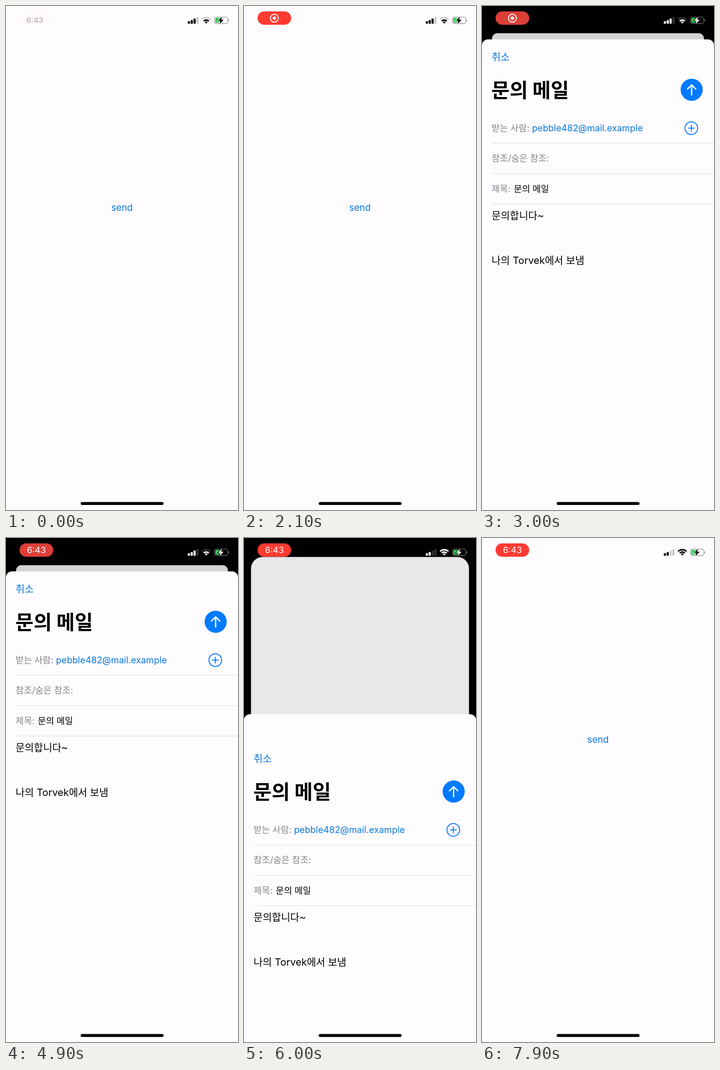
Write an HTML page that moves like this. It is 508 px wide and 1102 px high and loops after 8000 ms.

```html
<!DOCTYPE html>
<html lang="ko">
<head>
<meta charset="utf-8">
<title>Mail sheet</title>
<style>
  html, body { margin: 0; width: 100%; height: 100%; overflow: hidden; background: #000; }
  svg { display: block; width: 508px; height: 1102px; }
  text { font-family: Inter, "Noto Sans CJK KR", "Noto Sans CJK", sans-serif; font-size: 21.8px; }
  .page { fill: #fefcff; }
  .link { fill: #0879dc; }
  .label { fill: #858488; }
  .row { font-size: 19.5px; }
  .title { font-size: 43.4px; font-weight: 700; }
  .rule { stroke: #e4e3e6; stroke-width: 1.4; }
  .blue { fill: none; stroke: #007aff; stroke-width: 2; stroke-linecap: round; }
  #status { color: #000; --back: #fefcff; }
  #status rect, #status .solid { fill: currentColor; }
  .arc { fill: none; stroke: currentColor; stroke-width: 3.3; }
  .bolt { fill: currentColor; stroke: var(--back); stroke-width: 2.4; paint-order: stroke; }
</style>
</head>
<body>
<svg viewBox="0 0 508 1102" xmlns="http://www.w3.org/2000/svg">
  <rect width="508" height="1102"/>

  <g id="card">
    <rect id="cardBack" class="page" width="508" height="1102"/>
    <text class="link" x="254" y="448" text-anchor="middle" style="font-size:20.4px">send</text>
    <rect id="dim" width="508" height="1102"/>
  </g>

  <g id="sheet">
    <path id="sheetBack" class="page"/>
    <g id="content">
      <text class="link" x="21" y="46" letter-spacing="-.2">취소</text>
      <text class="title" x="20.5" y="126.6">문의 메일</text>
      <circle cx="459.1" cy="110.1" r="24.2" fill="#007aff"/>
      <path d="M459 121.5V99.5M450 108.5L459 99.5L468 108.5" fill="none" stroke="#fff"
        stroke-width="2.9" stroke-linecap="round" stroke-linejoin="round"/>

      <text class="row label" x="21" y="201">받는 사람:</text>
      <text class="link" x="109.5" y="200.5" style="font-size:19.8px">pebble482@mail.example</text>
      <circle class="blue" cx="458.3" cy="194.1" r="13.9"/>
      <path class="blue" d="M451.8 194.1h13M458.3 187.6v13"/>
      <path class="rule" d="M22 227H508M22 293.5H508M22 360H508"/>
      <text class="row label" x="21" y="267">참조/숨은 참조:</text>
      <text class="row label" x="21" y="333.5">제목:</text>
      <text class="row" x="69.5" y="333.5">문의 메일</text>

      <text x="21" y="393">문의합니다~</text>
      <text x="21" y="491">나의 Torvek에서 보냄</text>
    </g>
  </g>

  <rect x="163.5" y="1084.5" width="181.5" height="6.6" rx="3.3"/>

  <g id="status">
    <rect x="398" y="33.3" width="4.7" height="5.5" rx="1.2"/>
    <rect x="404.3" y="30.8" width="4.7" height="8" rx="1.2"/>
    <rect id="bar3" x="410.6" y="27.6" width="4.7" height="11.2" rx="1.2"/>
    <rect x="416.9" y="24.2" width="4.7" height="14.6" rx="1.2" opacity=".2"/>
    <g transform="translate(438.5 38.5)">
      <path class="solid" d="M0 0L-3.1-3.1A4.4 4.4 0 0 1 3.1-3.1Z"/>
      <path class="arc" d="M-5.48-5.48A7.75 7.75 0 0 1 5.48-5.48"/>
      <path id="wifiOuter" class="arc" d="M-9.16-9.16A12.95 12.95 0 0 1 9.16-9.16"/>
    </g>
    <path d="M456.3 28.5a4.4 4.4 0 0 1 4.4-4.4h20.5a4.4 4.4 0 0 1 4.4 4.4v5.6a4.4 4.4 0 0 1-4.4 4.4h-20.5a4.4 4.4 0 0 1-4.4-4.4z"
      fill="none" stroke="currentColor" stroke-width="1.3" opacity=".42"/>
    <path class="solid" d="M487 29a2.6 2.6 0 0 1 0 4.8z" opacity=".5"/>
    <path d="M468 26.1H460.8a2.5 2.5 0 0 0-2.5 2.5v5.4a2.5 2.5 0 0 0 2.5 2.5H468z" fill="#34c759"/>
    <path class="bolt" d="M473 22.8L464.3 32.4H469.4L467.7 39.8L476.4 30.1H471.2Z"/>
  </g>

  <text id="clock" x="63" y="37" text-anchor="middle" style="font-size:16.4px;font-weight:600">6:43</text>
  <g id="pill">
    <rect id="pillBack" x="29.7" y="11.8" width="73.6" height="29.2" rx="14.6"/>
    <g id="record">
      <circle cx="66.5" cy="26.6" r="8.7" fill="none" stroke="#fff" stroke-width="2"/>
      <circle cx="66.5" cy="26.6" r="3.7" fill="#fff"/>
    </g>
    <text id="pillClock" x="66.5" y="33.2" text-anchor="middle" fill="#fff" style="font-size:19.2px">6:43</text>
  </g>
</svg>
<script>
  const LOOP = 8000, OPEN = 2123, CLOSE = 5940.4, SIGNAL_DROP = 5900;
  const el = {};
  document.querySelectorAll("[id]").forEach(node => el[node.id] = node);

  const ramp = (t, from, to) => Math.min(1, Math.max(0, (t - from) / (to - from)));
  const set = (node, attrs) => {
    for (const name in attrs) node.setAttribute(name, attrs[name]);
  };

  // Critically damped spring from 0 to 1
  function spring(ms) {
    const x = Math.max(0, ms) * 0.01826;
    return 1 - (1 + x) * Math.exp(-x);
  }

  function sheetPath(bottomRadius) {
    const r = bottomRadius, h = 1029;
    return `M0 13A13 13 0 0 1 13 0H495A13 13 0 0 1 508 13V${h - r}` +
      `A${r} ${r} 0 0 1 ${508 - r} ${h}H${r}A${r} ${r} 0 0 1 0 ${h - r}Z`;
  }

  function drawSheet(t) {
    const closing = t >= CLOSE;
    let p = closing ? 1 - spring(t - CLOSE) : spring(t - OPEN);
    if (p < 0.001) p = 0;

    set(el.card, { transform: `translate(${22 * p} ${59.6 * p}) scale(${1 - 44 * p / 508})` });
    const radius = p < 0.002 ? 0 : 13 + 47 * (1 - p);
    set(el.cardBack, { rx: radius });
    set(el.dim, { rx: radius, opacity: 0.17 * p * p });

    set(el.sheet, {
      transform: `translate(0 ${1102 - 1029 * p})`,
      visibility: p ? "visible" : "hidden"
    });
    set(el.sheetBack, { d: sheetPath(!closing && p < 0.98 ? 60 : 0) });
    // The header regains its safe area inset while leaving
    set(el.content, { transform: `translate(0 ${closing ? 59 : 0})` });
  }

  function drawStatus(t) {
    const light = ramp(t, 2180, 2460) - ramp(t, 6050, 6330);
    const grey = Math.round(255 * light), back = 254 - Math.round(254 * light);
    el.status.style.color = `rgb(${grey},${grey},${grey})`;
    el.status.style.setProperty("--back", `rgb(${back},${back},${back})`);
    const dropped = t >= SIGNAL_DROP;
    set(el.bar3, { opacity: dropped ? 0.2 : 1 });
    set(el.wifiOuter, { opacity: dropped ? 1 : 0.2 });

    const glow = 0.5 + 0.5 * Math.cos(t / 1000 * Math.PI);
    set(el.pillBack, { fill: `rgb(${220 + 35 * glow},${63 - 5 * glow},${55 - 5 * glow})` });
    set(el.pill, { opacity: ramp(t, 0, 300) });
    set(el.clock, { opacity: 0.26 * (1 - ramp(t, 0, 150)) });
    const swap = ramp(t, 3750, 4050);
    set(el.record, { opacity: 1 - swap });
    set(el.pillClock, { opacity: swap });
  }

  const start = performance.now();
  function frame() {
    const t = (performance.now() - start) % LOOP;
    drawSheet(t);
    drawStatus(t);
    requestAnimationFrame(frame);
  }
  frame();
</script>
</body>
</html>
```
